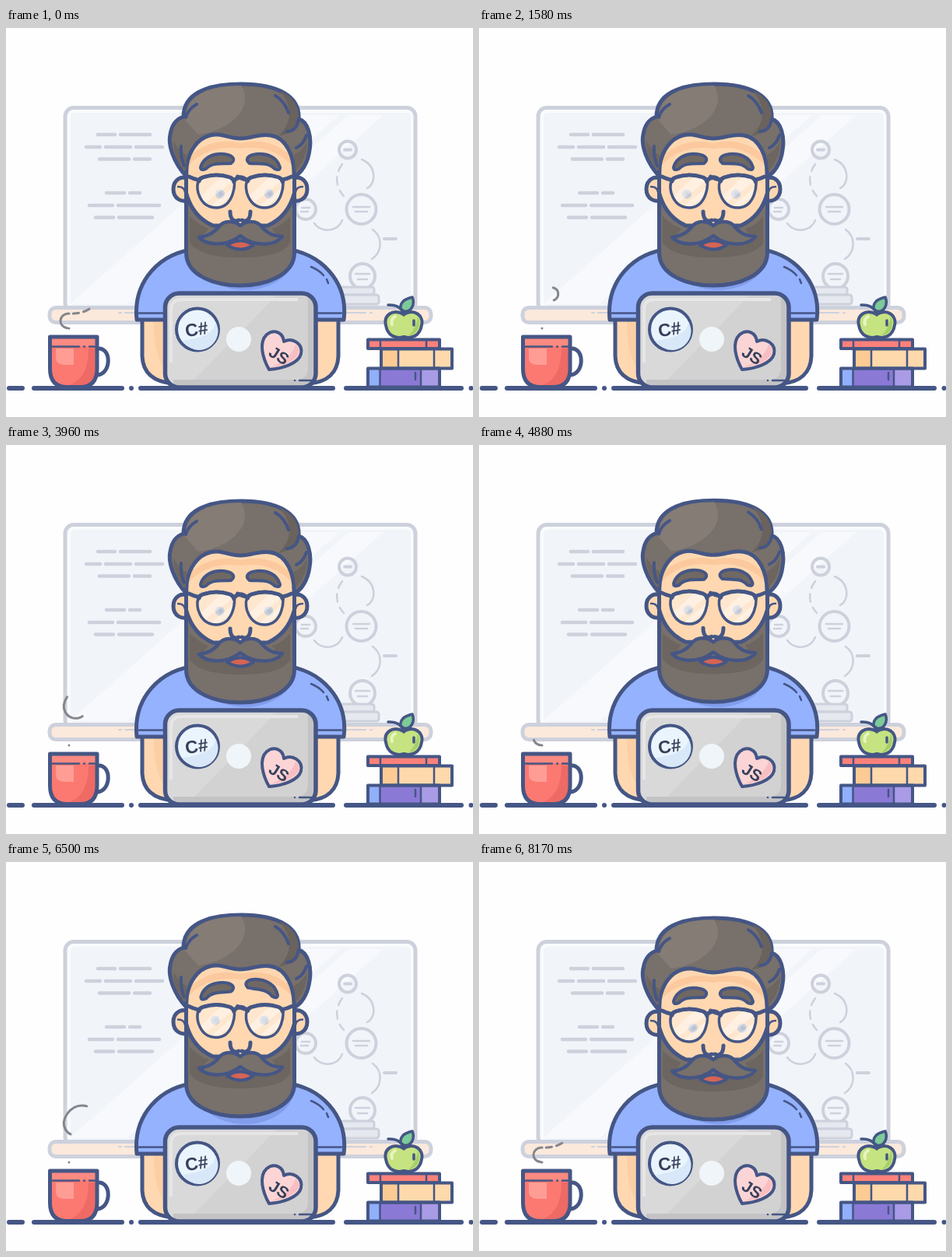
An HTML page that plays this animation: 600 px wide and 500 px high, repeating every 8.21 s.

```html
<!DOCTYPE html>
<html lang="en">
<head>
<meta charset="utf-8">
<title>Developer at work</title>
<style>
  html, body { margin: 0; width: 100%; height: 100%; overflow: hidden; background: #fefefe; }
  svg { display: block; width: 600px; height: 500px; }
  .ink { stroke: #455685; stroke-width: 5; stroke-linecap: round; stroke-linejoin: round; }
  .line { fill: none; }
  .thin { stroke-width: 2.5; }
  .mid { stroke-width: 4; }
  .pale { stroke: #cdd1dc; stroke-width: 4; stroke-linecap: round; stroke-linejoin: round; }
  .hair { fill: #78706a; }
  .skin { fill: #ffd8b1; }
  .steam { fill: none; stroke: #85868d; stroke-width: 3; stroke-linecap: round; }
  text { font: bold 23px "Liberation Sans", Arial, sans-serif; fill: #36405a; text-anchor: middle; }
</style>
</head>
<body>
<svg viewBox="0 0 600 500" xmlns="http://www.w3.org/2000/svg">
  <defs>
    <clipPath id="boardClip"><rect x="83" y="109" width="437" height="248" rx="5"/></clipPath>
    <clipPath id="lidClip"><rect x="206" y="343" width="191" height="117" rx="18"/></clipPath>
    <clipPath id="mugClip"><path d="M57 397H117V438Q117 461 95 461H79Q57 461 57 438Z"/></clipPath>
    <clipPath id="topClip"><path d="M228 114C228 86 255 72 302 72C350 72 378 88 376 117C374 132 366 138 352 139C332 132 318 142 301 141C284 140 272 130 250 143L226 128Z"/></clipPath>
    <path id="lens" d="M249 193Q270 184 291 193Q296 199 291 214Q285 231 270 231Q253 231 247 212Q244 200 249 193Z"/>
    <clipPath id="lensClip"><use href="#lens"/></clipPath>
    <path id="brow" d="M250 179C254 165 268 161 280 162C291 163 296 169 289 174C279 175 265 172 257 181Q250 184 250 179Z"/>
  </defs>

  <!-- board -->
  <rect x="76" y="102.500" width="450" height="262" rx="11" fill="#fafbfd" class="pale" style="stroke-width:5"/>
  <g clip-path="url(#boardClip)">
    <rect x="83" y="109" width="437" height="248" fill="#f1f4f9"/>
    <path d="M355 112L82 355H155L428 112ZM440 112L167 355H212L485 112Z" fill="#f7f9fc"/>
  </g>
  <path id="notes" class="pale line" style="stroke-width:4.500"/>
  <g class="pale line">
    <circle cx="439" cy="156.500" r="11"/><path d="M435 156.500H443"/>
    <circle cx="456.500" cy="233" r="19"/>
    <circle cx="385" cy="233" r="13"/>
    <circle cx="458" cy="319" r="16"/>
    <path d="M486 271H501"/>
    <g stroke-width="2.500" style="stroke-width:2.500">
      <path d="M446 230H467M449 236H464M380 231H390M379 236H388M449 316H467M452 323H464"/>
      <path d="M457 169C475 176 477 199 464 206M396 251C406 264 426 262 432 247M471 259C484 268 484 288 470 297"/>
      <path d="M432 175C423 187 422 203 434 216" stroke-dasharray="10 8"/>
    </g>
  </g>
  <g class="pale" fill="#e5e8ef" style="stroke-width:3">
    <rect x="415" y="333" width="58" height="10" rx="3"/>
    <rect x="415" y="343" width="64" height="12" rx="3"/>
  </g>
  <rect x="56" y="359.500" width="490" height="19" rx="8" fill="#fbe9db" class="pale" style="stroke-width:5"/>
  <path d="M145 366H148M153 366H205M400 366H462M468 366H470" class="pale line" style="stroke-width:2"/>

  <!-- steam -->
  <path class="steam" pathLength="207"/>
  <path class="steam" pathLength="207"/>

  <!-- body -->
  <path class="ink skin" d="M175 374V422C176 444 190 455 215 457V374ZM427 374V422C426 444 412 455 390 457V374Z"/>
  <path d="M190 377H206V440Q190 425 190 377Z" fill="#fbcfa5"/>
  <path class="ink" fill="#95b2fe" d="M168 375C163 326 197 288 246 284H357C404 288 440 326 434 375Z"/>
  <path class="ink line thin" d="M171 366.500H204M398 366.500H431"/>
  <path class="ink line thin" d="M392 307Q402 311 408 318M412 323L414 328"/>
  <path d="M243 288H371C371 315 346 335 310 337C270 337 245 317 243 288Z" fill="#819dec"/>

  <!-- ears -->
  <g id="ears">
    <g id="ear">
      <path class="ink skin" d="M236 195C226 188 215 195 215 207C215 219 226 226 236 220Z"/>
      <path class="ink line thin" d="M221 204Q229 204 230 211"/>
    </g>
    <use href="#ear" transform="matrix(-1 0 0 1 602 0)"/>
  </g>

  <g id="head">
    <path class="skin" d="M233 200V160Q250 130 301 132Q352 130 369 160V260H233Z"/>
    <path d="M236 165Q265 139 301 148Q340 139 366 165V175Q340 149 301 155Q262 149 236 175Z" fill="#fbc99d"/>
    <!-- beard -->
    <path class="ink hair" d="M231.500 192V288C231 319 270 331 301 331C333 331 371 318 370.500 288V192V212C364 236 350 248 336 254H266C252 248 238 236 231.500 212Z"/>
    <path d="M236 242C244 250 254 256 260 258L250 270Q280 285 300 276Q325 285 350 270L342 258Q356 254 365 242V276Q355 295 301 295Q249 295 236 276Z" fill="#6c6560"/>
    <path class="ink mid" fill="#d66454" d="M284 279Q301 268 318 279Q302 290 284 279Z"/>
    <!-- hair -->
    <path class="ink hair" d="M232 191C215 173 208 150 211 137C213 123 219 117 228 114C228 86 255 72 302 72C350 72 378 88 376 117C388 120 393 140 390 157C388 174 379 187 370 191C371 165 360 141 340 138C326 135 317 142 301 142C285 142 276 134 262 138C243 143 230 165 232 191Z"/>
    <g clip-path="url(#topClip)">
      <path d="M230 118Q232 74 302 74C318 98 295 130 247 137Z" fill="#857c76"/>
      <path d="M346 74Q385 92 374 132L350 139Q380 110 346 74Z" fill="#69625d"/>
    </g>
    <path d="M215 145Q222 158 232 163L231 184Q215 168 215 145ZM387 145Q381 158 370 163L372 184Q387 168 387 145Z" fill="#6c6560"/>
    <path class="ink line mid" d="M245 98Q234 104 231 115M346 87Q358 94 363 109M376 117Q374 132 361 133M386 138Q382 150 373 154M225 152Q224 166 229 177"/>
    <!-- nose and moustache -->
    <path class="skin" d="M288 232H314V249Q301 255 288 249Z"/>
    <path class="ink line" d="M288 236C288 246 293 250 299 247M314 236C314 246 309 250 303 247"/>
    <path class="ink hair mid" style="stroke-width:4.500" d="M248 269C262 267 268 262 273 256C280 246 294 248 301 254C308 248 322 246 329 256C334 262 340 267 355 268C345 281 318 281 301 267C284 281 258 280 248 269Z"/>

    <g id="face">
      <g id="eyes" fill="#aab3c5">
        <circle cx="269" cy="213.500" r="6"/><circle cx="332" cy="213.500" r="6"/>
        <circle cx="270" cy="213.500" r="3" fill="#929db6"/><circle cx="333" cy="213.500" r="3" fill="#929db6"/>
      </g>
      <g id="glass">
        <use href="#lens" fill="#fff" fill-opacity=".38"/>
        <g clip-path="url(#lensClip)"><path d="M284 184L244 222V234L300 190ZM300 198L256 235H266L304 204Z" fill="#fff" opacity=".38"/></g>
        <use href="#lens" class="ink line" style="stroke-width:3.500"/>
        <path class="ink line" d="M248 197Q249 193 253 192Q270 186 288 192Q292 194 293 198M246 195Q241 194 235 191"/>
      </g>
      <use href="#glass" x="62.500"/>
      <path d="M297.500 187H309" stroke="none"/>
      <path class="ink line" d="M293 196Q301 188 310 196M355 195Q361 194 367 191"/>
    </g>
    <use href="#brow" id="browL" class="ink mid" fill="#706862"/>
    <g id="browR"><use href="#brow" transform="matrix(-1 0 0 1 602 0)" class="ink mid" fill="#706862"/></g>
  </g>

  <!-- desk -->
  <path class="ink line" style="stroke-width:6" d="M4 463H21M36 463H149M161 463H161.010M173 463H420M437 463H585M597.500 463H597.510"/>

  <!-- laptop -->
  <g clip-path="url(#lidClip)">
    <rect x="204" y="341" width="195" height="121" fill="#d2d2d3"/>
    <path d="M204 341H350L232 462H204Z" fill="#d9d9da"/>
    <path d="M388 341H399V462H215V452H373Q388 452 388 436Z" fill="#c3c3c5"/>
    <path d="M212 430V362Q212 349 226 349H375" fill="none" stroke="#e6e6e7" stroke-width="4"/>
  </g>
  <rect class="ink line" style="stroke-width:5.500" x="204.500" y="341" width="193.500" height="121" rx="18"/>
  <path class="ink line thin" d="M371 453H371.010M377 453H392"/>
  <circle cx="299" cy="400" r="16" fill="#eff5f8"/>
  <circle class="ink mid" cx="246" cy="387.500" r="27" fill="#eaf4fd"/>
  <path d="M227 402A24 24 0 0 0 269 377Q269 397 227 402Z" fill="#d8e8f8"/>
  <text transform="translate(246 395) rotate(-9)">C#</text>
  <path class="ink mid" fill="#fbd5d6" d="M338 439C330 425 324 404 335 394C345 386 356 392 357 403C368 397 382 406 379 419C376 431 355 438 338 439Z"/>
  <path d="M340 436Q366 426 372 407Q378 412 376 418C373 427 357 434 340 436Z" fill="#f8bec1"/>
  <text transform="translate(347 427) rotate(32)" style="font-size:21px">JS</text>

  <!-- mug -->
  <path class="ink line" d="M118 412C136 410 136 446 116 446"/>
  <g clip-path="url(#mugClip)">
    <rect x="55" y="395" width="65" height="68" fill="#fb7971"/>
    <path d="M118 412V462H70Q106 458 106 412Z" fill="#ee6a65"/>
    <rect x="55" y="395" width="65" height="14" fill="#fb8a81"/>
    <path d="M64 412H87V433H77Q64 433 64 424Z" fill="#ff9d95"/>
  </g>
  <path class="ink line" d="M56.500 397H117V438Q117 461.500 95 461.500H79Q56.500 461.500 56.500 438Z"/>
  <path class="ink line thin" d="M60 409.500H94M100 409.500H101M107 409.500H114"/>

  <!-- books -->
  <g stroke-linejoin="round">
    <rect x="465" y="438" width="92" height="23" fill="#8b79d6"/>
    <rect x="465" y="438" width="15" height="23" fill="#91affb"/>
    <rect x="533" y="438" width="24" height="23" fill="#a99be6"/>
    <rect x="482" y="413" width="91" height="24" fill="#fdd9ac"/>
    <rect x="482" y="413" width="22" height="24" fill="#fccb94"/>
    <rect x="465" y="401" width="92" height="11" fill="#fb817a"/>
    <g class="ink line mid">
      <rect x="465" y="437.500" width="92" height="24"/>
      <rect x="482" y="412.500" width="91" height="25"/>
      <rect x="465" y="400.500" width="92" height="11.500"/>
      <path class="thin" d="M480.500 439V460M533 439V460M504 414V436M550 414V436M481 402V411M540 402V411M526 443V452"/>
    </g>
  </g>
  <path class="ink mid" fill="#c5e380" d="M511 368C496 360 485 370 488 382C490 395 500 400 511 397C522 400 532 395 534 382C537 370 525 360 511 368Z"/>
  <path d="M529 370Q536 390 517 396Q528 385 529 370Z" fill="#a5cf6c"/>
  <path d="M496 381Q494 374 500 371" fill="none" stroke="#e6f4c0" stroke-width="4" stroke-linecap="round"/>
  <path class="ink line" style="stroke-width:3.500" d="M491 356Q508 355 511 369M524 376V382"/>
  <path class="ink" style="stroke-width:3.500" fill="#7ccb98" d="M507 361C506 351 514 348 522 346C526 356 520 366 511 364Z"/>
</svg>
<script>
const LOOP = 8210, CYCLE = LOOP / 3, LENGTH = 207;
const byId = id => document.getElementById(id);
const clamp = v => Math.max(0, Math.min(1, v));
const sine = v => (1 - Math.cos(Math.PI * clamp(v))) / 2;

// Each row: y, then start and end of every stroke.
const notes = [
  [137, 118, 140, 147, 185], [153, 103, 121, 128, 160, 167, 201], [168.5, 120, 158, 165, 185],
  [212, 129, 152, 159, 172], [228, 107, 137, 144, 197], [243.5, 115, 138, 145, 188]
];
byId('notes').setAttribute('d', notes.map(([y, ...xs]) =>
  xs.map((x, i) => (i % 2 ? 'H' + x : `M${x} ${y}`)).join('')).join(''));

const steam = [...document.querySelectorAll('.steam')];
const curl = 'M81 386C66 385 67 368 80 367C94 368 107 364 115 354' +
  'C123 338 117 313 98 313C82 313 70 331 76 343C80 351 88 352 93 351C104 349 106 334 91 333';
steam.forEach(p => p.setAttribute('d', curl));
const strokes = [[0, 31], [36, 43], [49, 57], [62, LENGTH]];

const gaze = [[0, 6], [220, -2], [1368, 6], [1588, -2], [2736, 6], [2956, -2],
  [4104, 6], [4400, 0], [7400, 0], [7950, 6], [LOOP, 6]];
const lift = [[0, 0], [4750, 0], [5250, 1], [7350, 1], [7950, 0], [LOOP, 0]];

function tween(steps, t) {
  const i = steps.findIndex(s => s[0] > t);
  const [t0, a] = steps[i - 1], [t1, b] = steps[i];
  return a + (b - a) * sine((t - t0) / (t1 - t0));
}

function drawSteam(path, age) {
  const head = LENGTH * sine(age / 2900);
  const tail = LENGTH * sine((age - 909) / 2230);
  const dashes = [0];
  let end = 0;
  for (const [from, to] of strokes) {
    const a = Math.max(from, tail), b = Math.min(to, head);
    if (b <= a) continue;
    dashes.push(a - end, b - a);
    end = b;
  }
  path.style.display = end ? '' : 'none';
  path.setAttribute('stroke-dasharray', [...dashes, LENGTH * 2].join(' '));
}

function move(id, x, y, extra = '') {
  byId(id).setAttribute('transform', `translate(${x} ${y}) ${extra}`);
}

function draw(t) {
  const up = tween(lift, t);
  move('head', 0, -4 * up);
  move('ears', 0, -1.5 * up);
  move('face', 0, -1.5 * up);
  move('eyes', tween(gaze, t), -4.5 * up);
  move('browL', 0, -2.5 * up, `rotate(${-3 * up} 270 172)`);
  move('browR', -2 * up, -6 * up, `rotate(${7 * up} 332 172)`);
  const age = (t - 1680 + LOOP) % CYCLE;
  drawSteam(steam[0], age);
  drawSteam(steam[1], age + CYCLE);
}

const start = performance.now();
function tick() {
  draw((performance.now() - start) % LOOP);
  requestAnimationFrame(tick);
}
tick();
</script>
</body>
</html>
```
